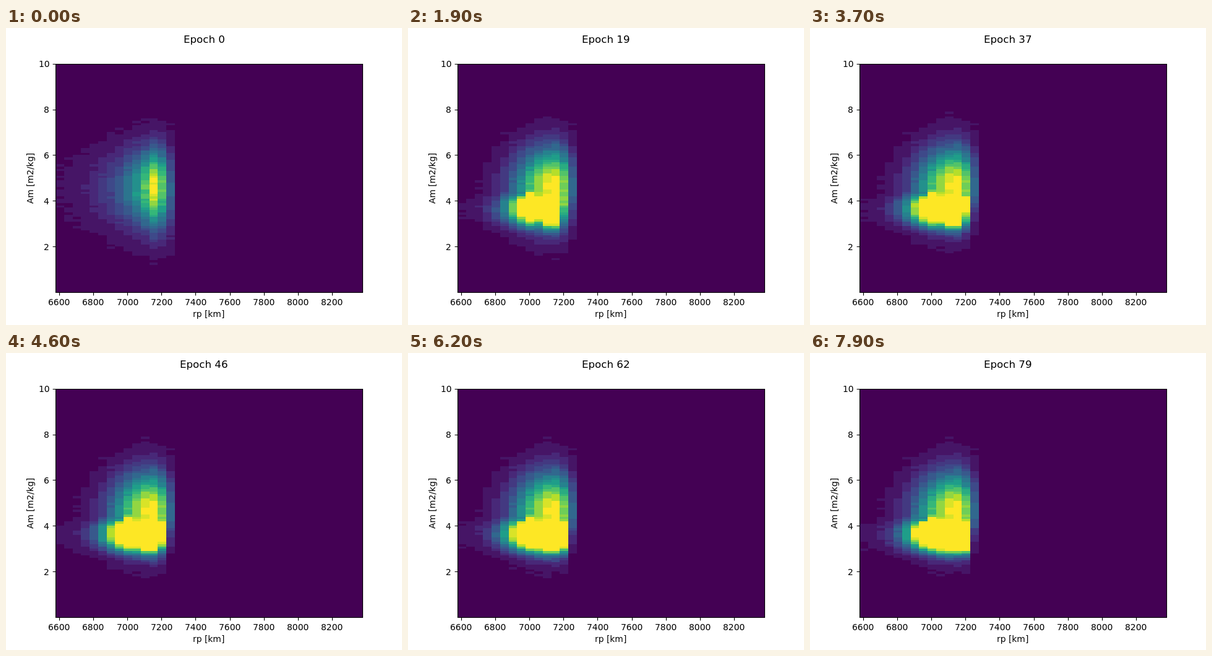
An HTML page with a canvas that plays this animation: 640 px wide and 480 px high, repeating every 8000 ms.

```html
<!DOCTYPE html>
<html lang="en">
<head>
<meta charset="utf-8">
<title>Epoch histogram</title>
<style>
  html, body { margin: 0; width: 100%; height: 100%; overflow: hidden; background: #fff; }
  canvas { display: block; }
</style>
</head>
<body>
<canvas id="stage" width="640" height="480"></canvas>
<script>
const ctx = document.getElementById('stage').getContext('2d');
const STEP = 100, EPOCHS = 80, MAX_COUNT = 18;
const LEFT = 80, BOTTOM = 427.2, COL_W = 496 / 36, ROW_H = 3.696;
const COLS = 14, ROWS = 100, PEAK_COL = 11;

const viridis = ['440154', '482878', '3e4989', '31688e', '26828e',
                 '1f9e89', '35b779', '6ece58', 'b5de2b', 'fde725']
  .map(h => [0, 2, 4].map(i => parseInt(h.slice(i, i + 2), 16)));

const mix = (a, b, k) => a + (b - a) * k;
const bell = (d, sigma) => Math.exp(-((d / sigma) ** 2) / 2);

function hash(c, r, e) {
  const s = Math.sin(c * 12.9898 + r * 78.233 + e * 37.719) * 43758.5453;
  return s - Math.floor(s);
}

function color(v) {
  const x = Math.min(Math.max(v, 0), 1) * 9, i = Math.min(Math.floor(x), 8);
  return `rgb(${viridis[i].map((a, j) => Math.round(mix(a, viridis[i + 1][j], x - i)))})`;
}

// Broad hump: its left flank turns from exponential to bell-shaped
function humpHeight(c, e) {
  const d = PEAK_COL - c, settle = 1 - Math.exp(-e / 6);
  const flank = d < 0 ? bell(d, 1.32) : mix(Math.exp(-d / 3.2), bell(d, 3.2), settle);
  return flank * (1 + .06 * settle);
}

// Narrow band: most columns fill at once, 9 and 12 lag behind
function bandHeight(c, e) {
  if (c > 12) return 0;
  const power = c === 9 ? .7 : c === 12 ? 1.8 : .25;
  return (2.3 * bell(c - 10.5, 3) + .04) * (e / (EPOCHS - 1)) ** power;
}

function columnShape(c, e) {
  const hump = humpHeight(c, e), band = bandHeight(c, e);
  const low = c > 12 ? .75 + .6 * Math.exp(-e / 25) : .97 + .26 * Math.exp(-e / 35);
  const reach = c === 8 ? .8 : .62, power = c < 7 ? 3 : 8;
  return y => {
    const h = y - 4.62, d = y - 3.55;
    const edge = d > 0 ? Math.exp(-((d / reach) ** power)) : bell(d, .42);
    return hump * bell(h, h > 0 ? 1.13 : low) + band * edge;
  };
}

function drawCells(e) {
  ctx.fillStyle = color(0);
  ctx.fillRect(LEFT, 58, 496, 369);
  for (let c = 0; c < COLS; c++) {
    const shape = columnShape(c, e);
    const x0 = Math.round(LEFT + c * COL_W), x1 = Math.round(LEFT + (c + 1) * COL_W);
    for (let r = 0; r < ROWS; r++) {
      const n = shape((r + .5) / 10) * MAX_COUNT;
      const noise = (hash(c, r, c < 3 ? e : 0) - .5) * (.4 + .08 * n);
      const count = Math.round(n + noise);
      if (count < 1) continue;
      const y0 = Math.round(BOTTOM - (r + 1) * ROW_H), y1 = Math.round(BOTTOM - r * ROW_H);
      ctx.fillStyle = color(count / MAX_COUNT);
      ctx.fillRect(x0, y0, x1 - x0, y1 - y0);
    }
  }
}

// Text starts on a whole pixel; anchor is 0.5 for centred, 1 for right-aligned
function text(s, x, y, anchor = .5, size = 13.89) {
  ctx.font = `${size}px "DejaVu Sans", sans-serif`;
  ctx.fillText(s, Math.round(x - ctx.measureText(s).width * anchor), Math.round(y));
}

function drawAxes() {
  ctx.fillStyle = ctx.strokeStyle = '#000';
  ctx.lineWidth = 1.11;
  ctx.strokeRect(80.5, 58.5, 496, 369);
  ctx.beginPath();
  for (let km = 6600; km <= 8200; km += 200) {
    const x = LEFT + (km - 6578.2) / 1800 * 496;
    ctx.moveTo(Math.round(x) + .5, 427.5);
    ctx.lineTo(Math.round(x) + .5, 432.4);
    text(km, x, 448);
  }
  for (let v = 2; v <= 10; v += 2) {
    const y = BOTTOM - v * 36.96;
    ctx.moveTo(80.5, Math.round(y) + .5);
    ctx.lineTo(75.6, Math.round(y) + .5);
    text(v, 70.3, y + 5.3, 1);
  }
  ctx.stroke();
  text('rp [km]', 328, 467);
  ctx.save();
  ctx.translate(44, 243);
  ctx.rotate(-Math.PI / 2);
  text('Am [m2/kg]', 0, 0);
  ctx.restore();
}

function draw(e) {
  ctx.fillStyle = '#fff';
  ctx.fillRect(0, 0, 640, 480);
  drawCells(e);
  drawAxes();
  text('Epoch ' + e, 320, 24, .5, 16.67);
}

const start = performance.now();
let shown = -1;
function tick() {
  const e = Math.floor((performance.now() - start) / STEP) % EPOCHS;
  if (e !== shown) draw(shown = e);
  requestAnimationFrame(tick);
}
tick();
</script>
</body>
</html>
```
